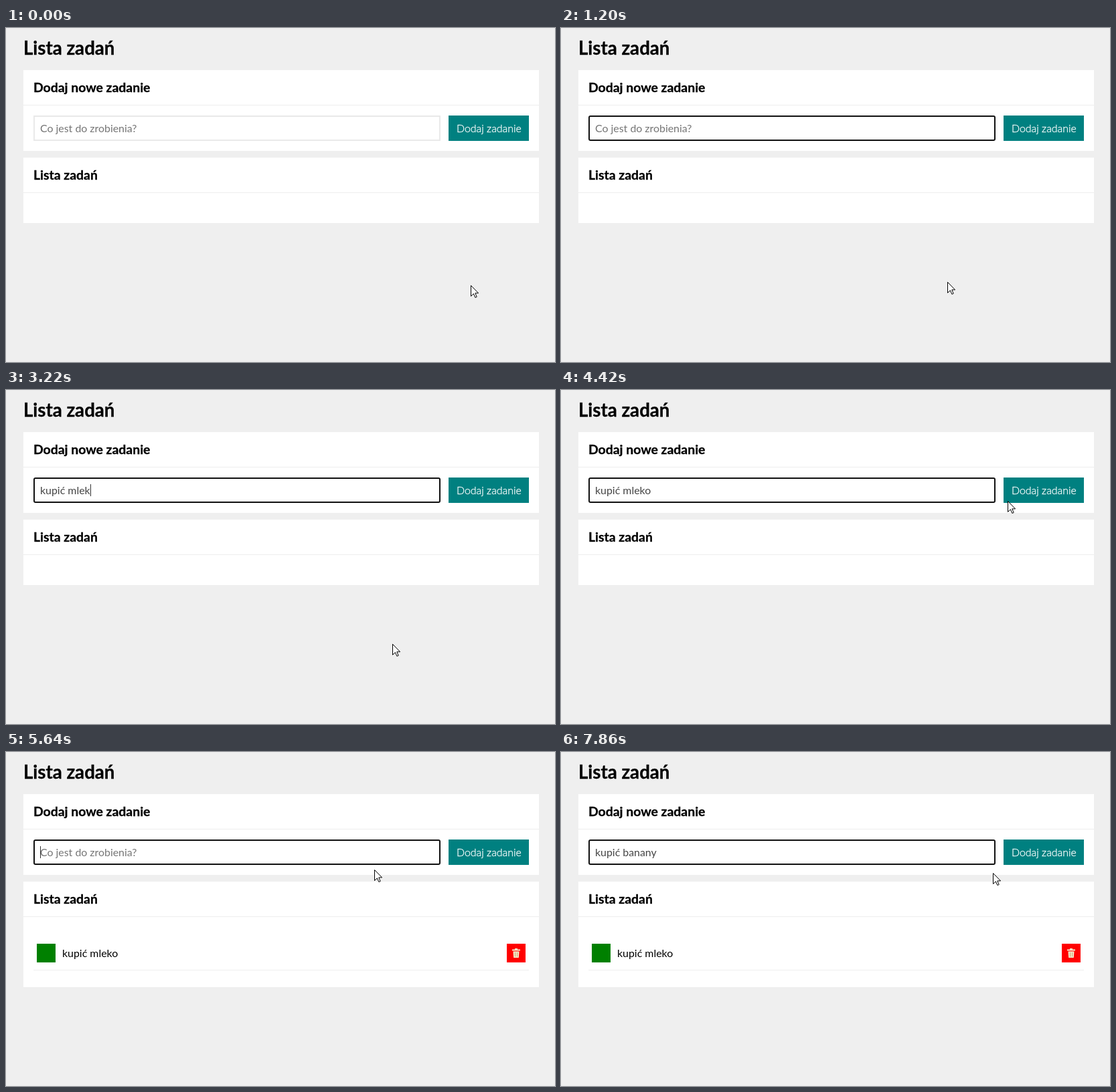
An HTML page that plays this animation: 820x500 px, repeating every 8 s.

```html
<!DOCTYPE html>
<html lang="pl">
<head>
<meta charset="utf-8">
<title>Lista zadań</title>
<style>
  html, body { margin: 0; width: 100%; height: 100%; overflow: hidden; background: #efefef; }
  svg { display: block; width: 820px; height: 500px; }
  text { font: 15.9px Lato, sans-serif; white-space: pre; }
  .title, .head { font-weight: 700; stroke: #000; stroke-width: .3; }
  .title { font-size: 27.6px; }
  .head { font-size: 19.4px; }
  .button { font-weight: 300; fill: #fff; stroke: #fff; stroke-width: .3; }
  .rule { fill: #eee; }
</style>
</head>
<body>
<svg viewBox="0 0 820 500">
  <rect width="820" height="500" fill="#efefef"/>
  <text class="title" x="26" y="40">Lista zadań</text>

  <rect x="26" y="63" width="770" height="121" fill="#fff"/>
  <rect class="rule" x="26" y="115" width="770" height="1"/>
  <text class="head" x="41" y="96">Dodaj nowe zadanie</text>
  <rect id="field" x="42" y="132" width="606" height="36" fill="#fff" stroke-width="2"/>
  <text id="entry" x="51" y="156"></text>
  <rect id="caret" y="141" width="1" height="18" fill="#333"/>
  <rect x="661" y="131" width="120" height="38" fill="#008080"/>
  <text class="button" x="673" y="156">Dodaj zadanie</text>

  <rect id="list" x="26" y="194" width="770" fill="#fff"/>
  <rect class="rule" x="26" y="246" width="770" height="1"/>
  <text class="head" x="41" y="227">Lista zadań</text>
  <g id="task">
    <rect x="46" y="287" width="28" height="28" fill="#008000"/>
    <text x="84" y="307">kupić mleko</text>
    <rect x="748" y="287" width="28" height="28" fill="#f00"/>
    <g fill="#f5e8c8">
      <path d="M760 294h4v1.5h4v2h-12v-2h4z"/>
      <path d="M757.5 298.5h9l-.7 9.5h-7.6z"/>
      <path d="M760.5 300v6.5M763.5 300v6.5" stroke="#c08a55" stroke-width=".8"/>
    </g>
    <rect class="rule" x="41" y="326" width="740" height="1"/>
  </g>

  <g id="pointer">
    <path id="arrow" d="M.5 .5V16.5L4.4 12.8 6.9 18.5 9.2 17.5 6.8 11.9H11.6Z" fill="#fff" stroke="#000"/>
    <path id="beam" d="M-3-8.5H-.5M1.5-8.5H4M.5-8V8M-3 8.5H-.5M1.5 8.5H4" fill="none" stroke="#000"/>
  </g>
</svg>
<script>
  const LOOP = 8000;
  const BEAT = 201.5; // the screen refreshes once per beat; all times below are in beats
  const ADDED = 24;

  const entries = [
    { text: 'kupić mleko', focus: 3, start: 8, end: 17, submit: ADDED },
    { text: 'kupić banany', focus: 27, start: 29, end: 37, submit: Infinity }
  ];

  // Pointer stops: beat, x, y
  const stops = [
    [0, 694, 385], [3, 523, 165], [6, 577, 380], [19, 577, 380], [22, 667, 166],
    [25, 583, 179], [27, 540, 152], [29, 559, 199], [38, 559, 199], [39, 645, 181]
  ];

  const $ = id => document.getElementById(id);
  const set = (id, attrs) => {
    for (const key in attrs) $(id).setAttribute(key, attrs[key]);
  };
  const show = (id, on) => set(id, { visibility: on ? 'visible' : 'hidden' });
  const clamp = v => Math.min(1, Math.max(0, v));

  function pointerAt(beat) {
    const next = stops.findIndex(stop => stop[0] > beat);
    if (next < 0) return stops.at(-1).slice(1);
    const [t0, x0, y0] = stops[next - 1];
    const [t1, x1, y1] = stops[next];
    const u = (beat - t0) / (t1 - t0);
    return [x0 + (x1 - x0) * u, y0 + (y1 - y0) * u].map(Math.round);
  }

  // Letters arrive at an even pace between start and end.
  const typed = ({ text, start, end }, beat) =>
    text.slice(0, Math.round(text.length * clamp((beat - start) / (end - start))));

  // The caret blinks off three beats after focus and stays lit while typing.
  const caretLit = ({ focus, start, end }, beat) =>
    beat < focus + 3 || (beat > start && beat < end + 2);

  function render(t) {
    const beat = Math.floor(t / BEAT + .1);
    const entry = entries.find(e => beat >= e.focus && beat < e.submit);
    const text = entry ? typed(entry, beat) : '';
    const added = beat >= ADDED;

    set('field', { stroke: entry ? '#101010' : '#e9e9e9', rx: entry ? 2 : 0 });
    $('entry').textContent = text || 'Co jest do zrobienia?';
    set('entry', { fill: text ? '#444' : '#757575' });
    const width = text ? $('entry').getComputedTextLength() : 0;
    set('caret', { x: Math.round(51 + width) });
    show('caret', entry && caretLit(entry, beat));

    set('list', { height: added ? 158 : 98 });
    show('task', added);

    const [x, y] = pointerAt(beat);
    const overField = x > 41 && x < 649 && y > 131 && y < 169;
    set('pointer', { transform: `translate(${x} ${y})` });
    show('arrow', !overField);
    show('beam', overField);
  }

  const start = performance.now();
  function tick() {
    render((performance.now() - start) % LOOP);
    requestAnimationFrame(tick);
  }
  tick();
</script>
</body>
</html>
```
